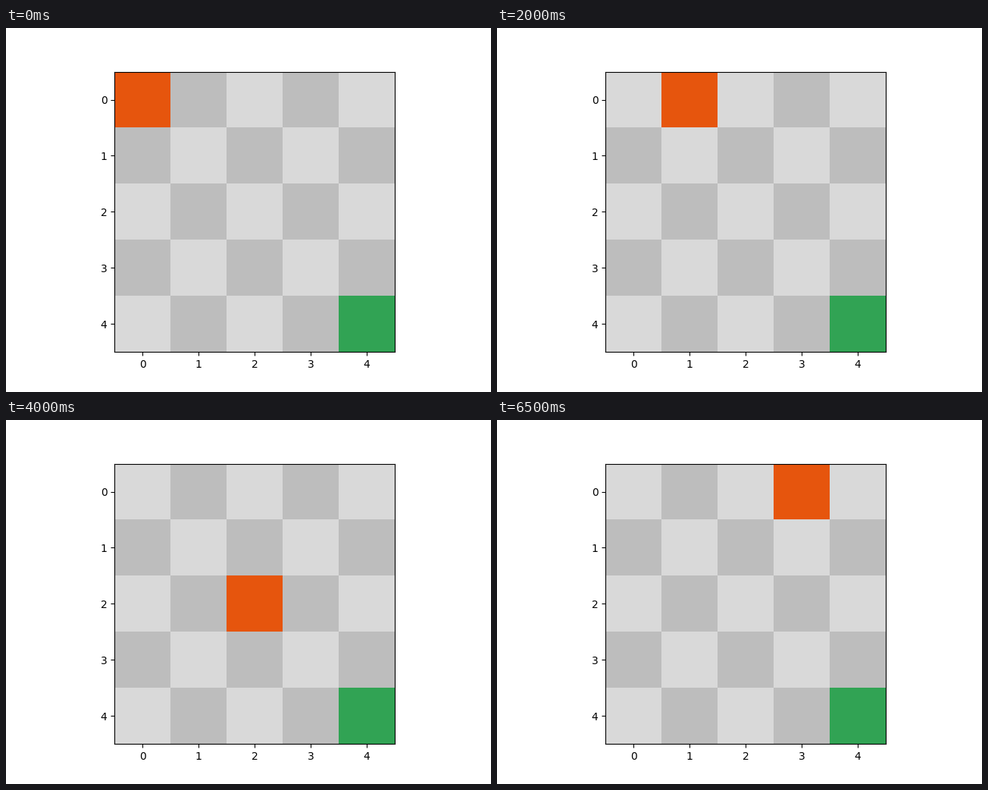
Animation of 640x480 px, one loop 8 s. Source, as a matplotlib script:

```python
from itertools import accumulate

import numpy as np
import matplotlib.pyplot as plt
from matplotlib.animation import FuncAnimation
from matplotlib.colors import to_rgb

SIZE = 5
STEP_MS = 500
LIGHT, DARK, AGENT, GOAL = map(to_rgb, ("#d9d9d9", "#bdbdbd", "#e6550d", "#31a354"))

# One letter per step: Right, Left, Up, Down; a dot waits.
MOVES = "R.RLD.RDRU..U.."


def move(cell, letter):
    row, col = cell
    return (row + (letter == "D") - (letter == "U"),
            col + (letter == "R") - (letter == "L"))


path = list(accumulate(MOVES, move, initial=(0, 0)))

rows, cols = np.indices((SIZE, SIZE))
board = np.array([LIGHT, DARK])[(rows + cols) % 2]
board[-1, -1] = GOAL


def grid_at(step):
    grid = board.copy()
    grid[path[step]] = AGENT
    return grid


fig, ax = plt.subplots(figsize=(6.4, 4.8), dpi=100)
image = ax.imshow(grid_at(0), interpolation="nearest")
ax.set_xticks(range(SIZE))
ax.set_yticks(range(SIZE))


def update(step):
    image.set_data(grid_at(step))
    return [image]


anim = FuncAnimation(fig, update, frames=len(path), interval=STEP_MS,
                     repeat=True, repeat_delay=0)
plt.show()
```
